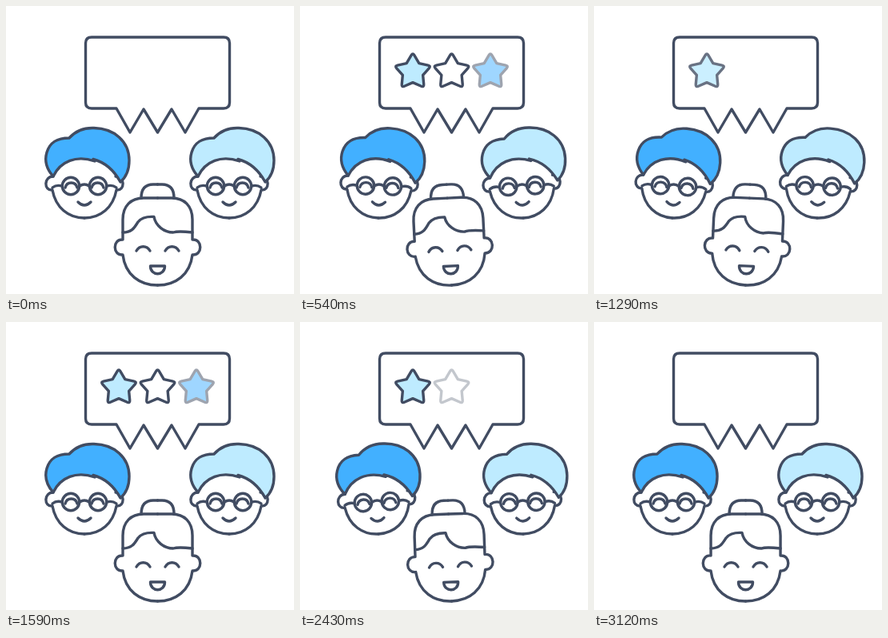
An HTML page that plays this animation: 360 by 360 pixels, repeating every 3150 ms.

```html
<!DOCTYPE html>
<html lang="en">
<head>
<meta charset="utf-8">
<title>Group review</title>
<style>
  html, body { margin: 0; width: 100%; height: 100%; overflow: hidden; background: #fff; }
  svg { display: block; width: 100vw; height: 100vh; }
  #left { color: #42b0ff; }
  #right { color: #beebff; }
</style>
</head>
<body>
<svg viewBox="0 0 360 360" fill="none" stroke="#414c62" stroke-width="3.4" stroke-linecap="round" stroke-linejoin="round">
  <defs>
    <!-- Left halves, mirrored to complete each face -->
    <g id="manHalf">
      <path d="M98 265C78 265 62 252 58 230C47 231 47 213 59 213M58 227Q63 223 70 225"/>
      <circle cx="81" cy="225" r="10.7"/>
      <path d="M74 227C76 219 87 219 89 227"/>
    </g>
    <g id="man">
      <use href="#manHalf"/>
      <use href="#manHalf" transform="translate(196) scale(-1 1)"/>
      <path d="M92 225Q98 221 104 225M90 245Q98 253 106 245"/>
      <path fill="currentColor" d="M59 213C51 204 48 193 51 183C55 170 64 165 79 165C88 155 98 152 110 152.500C135 153 154 169 154 193C154 205 150 214 143 220C137 209 126 196 109 191.500L111 194C88 186 68 194 59 213Z"/>
    </g>
    <g id="womanHalf">
      <path d="M189.500 223H184C175 223 169 228 169 240"/>
      <path d="M189.500 240H172C156 240 146 250 146 267V292C133 291 133 312 146 311C149 336 167 349 189.500 349"/>
      <path d="M163 306C167 299 176 299 180 306"/>
    </g>
  </defs>

  <path d="M138 128H107Q99.500 128 99.500 120.500V46.500Q99.500 39 107 39H272Q279.500 39 279.500 46.500V120.500Q279.500 128 272 128H241L224 158L207 129L189.500 158L172 129L155 158Z"/>
  <g id="stars"></g>

  <g id="left"><use href="#man"/></g>
  <g id="right"><use href="#man" x="181"/></g>
  <g id="woman">
    <use href="#womanHalf"/>
    <use href="#womanHalf" transform="translate(379) scale(-1 1)"/>
    <path d="M146 283C158 283 161 276 165 270C169 265 177 263 185 263.500C187 275 198 283 209 283Q215 281 233 283"/>
    <path d="M180.500 325H198.500C198.500 338 180.500 338 180.500 325Z"/>
  </g>
</svg>
<script>
const LOOP = 3150, SWAY = LOOP / 2, REVIEW = LOOP / 3;
const $ = id => document.getElementById(id);
const clamp = x => Math.max(0, Math.min(1, x));
const ease = p => (1 - Math.cos(Math.PI * p)) / 2;

// A head leans right, left, right at its turns, then rests upright.
// On every second sway the turns come later by the lag.
const heads = [
  { el: $("left"), pivot: "98 263", swing: 3.8, turns: [394, 787, 1181], lag: 0 },
  { el: $("right"), pivot: "279 263", swing: 4.2, turns: [275, 640, 1050], lag: 40 },
  { el: $("woman"), pivot: "189.5 348", swing: 3.8, turns: [270, 620, 1110], lag: 80 }
];

function lean({ swing, turns, lag }, t) {
  const late = t < SWAY ? 0 : lag, local = t % SWAY;
  const times = [0, ...turns.map(turn => turn + late), SWAY];
  const poses = [0, swing, -swing, swing, 0];
  const i = times.findIndex(time => time > local);
  const p = (local - times[i - 1]) / (times[i] - times[i - 1]);
  return poses[i - 1] + (poses[i] - poses[i - 1]) * ease(p);
}

// Five-pointed star with rounded tips.
function starPath(cx, cy, outer = 24, inner = 13.3, round = 0.25) {
  const at = i => {
    const r = i % 2 ? inner : outer, a = i * Math.PI / 5;
    return [cx + r * Math.sin(a), cy - r * Math.cos(a)];
  };
  const mix = (a, b) => a.map((v, k) => v + (b[k] - v) * round);
  let d = "";
  for (let i = 0; i < 10; i += 2) {
    const tip = at(i), before = at(i - 1), after = at(i + 1);
    d += `${i ? "L" : "M"}${mix(tip, before)}Q${tip} ${mix(tip, after)}L${after}`;
  }
  return d + "Z";
}

const stars = ["#beebff", "#fff", "#42b0ff"].map((fill, i) => {
  const star = document.createElementNS("http://www.w3.org/2000/svg", "path");
  star.setAttribute("d", starPath(141 + i * 48.5, 82.3));
  star.setAttribute("fill", fill);
  return $("stars").appendChild(star);
});

function draw(t) {
  for (const head of heads)
    head.el.setAttribute("transform", `rotate(${lean(head, t)} ${head.pivot})`);
  const r = t % REVIEW, gone = clamp((r - 800) / 160);
  stars.forEach((star, i) => {
    const shown = clamp((r - 100 - i * 175) / 180);
    star.setAttribute("opacity", shown * (1 - gone));
  });
}

const start = performance.now();
function frame() {
  draw(Math.max(0, performance.now() - start) % LOOP);
  requestAnimationFrame(frame);
}
frame();
</script>
</body>
</html>
```
